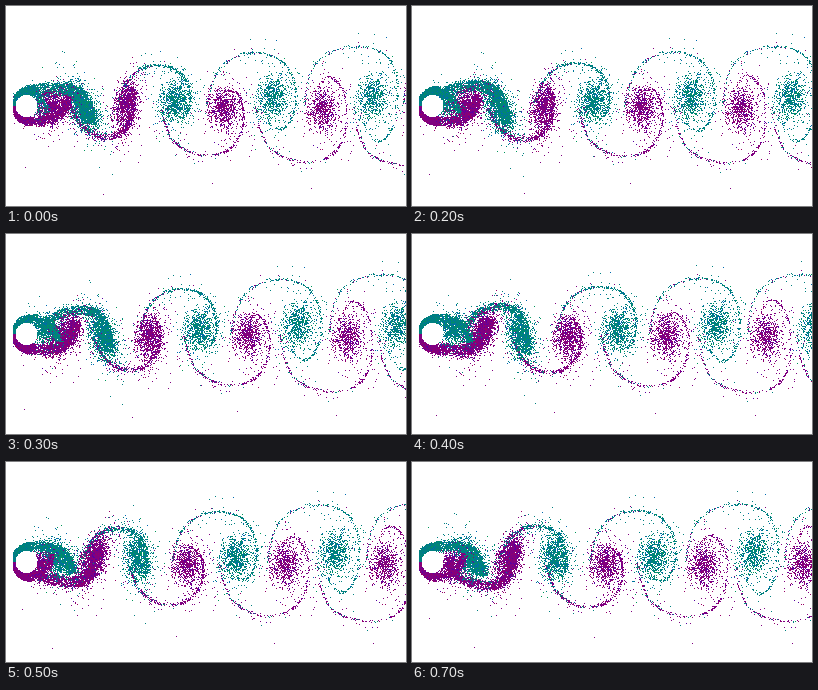
A matplotlib script that plays this animation: 400 by 200 pixels, repeating every 0.8 s.

```python
import numpy as np
import matplotlib.pyplot as plt
from matplotlib.animation import FuncAnimation

W, H = 400, 200
AXIS_Y = 100
PHASES = [0, 0, 1, 2, 3, 5, 5, 6]      # eighths of a shedding period

TEALS = np.array([(0, 128, 128), (0, 150, 90), (0, 106, 176)], np.uint8)
PURPLES = np.array([(128, 0, 128), (152, 0, 100), (88, 0, 164)], np.uint8)

# Braid paths around a vortex centre (y up), keyed by age in half periods.
PATHS = {
    0: [(-36, 6), (-31, 13), (-23, 18), (-13, 19), (-2, 18),
        (7, 14), (13, 9), (18, 3), (20, -3), (21, -9)],
    1: [(-68, 10), (-58, 19), (-45, 22), (-31, 23), (-18, 23),
        (-8, 20), (1, 13), (7, 3), (11, -8), (11, -18)],
    2: [(-56, 2), (-50, 14), (-43, 25), (-31, 32), (-17, 34),
        (-4, 30), (5, 19), (9, 6), (10, -8), (8, -20)],
    3: [(-57, 4), (-54, 14), (-47, 27), (-36, 37), (-21, 42),
        (-4, 39), (9, 29), (15, 14), (14, -4), (5, -16)],
    4: [(-62, 2), (-59, 20), (-50, 36), (-34, 47), (-14, 50),
        (5, 44), (17, 28), (20, 8), (14, -13), (-2, -16)],
    5: [(-66, 0), (-62, 20), (-51, 40), (-31, 52), (-8, 53),
        (11, 43), (22, 22), (22, -5), (9, -24), (-9, -14)],
    7: [(-68, 0), (-64, 30), (-50, 50), (-26, 59), (0, 58),
        (18, 45), (25, 18), (20, -22), (3, -36), (-13, -10)],
}
AGES = [-1] + list(PATHS)
KEYS = np.array([np.array(PATHS[0]) * (.6, .8)] + list(PATHS.values()), float)


def curve(*points):
    """Piecewise linear function of age."""
    xs, ys = zip(*points)
    return lambda s: np.interp(s, xs, ys)


core_x = curve((-1, 30), (-.5, 38), (0, 45), (.5, 58), (1, 78), (1.5, 97),
               (2, 120), (2.5, 143), (3, 169.5), (4, 218), (5, 267),
               (6, 317), (7, 367), (10, 515))
core_y = curve((-1, 2), (-.5, 5), (0, 3), (.5, 2), (1, -1), (1.4, -3),
               (2, 0), (2.3, 4), (3, 4), (4.5, 3.5), (5, 6), (6, 7), (7, 6))
core_w = curve((-1, 4), (-.5, 7), (0, 9), (1, 7), (2, 6), (3, 7.5), (5, 7.5))
core_h = curve((-1, 5), (-.5, 7), (0, 8), (1, 12), (2, 12), (3, 9.5), (5, 10.5))
core_lean = curve((0, .2), (.3, .35), (1, .42), (1.5, .28), (2, .15), (3, 0))
core_count = curve((-1.2, 0), (-1, 250), (-.5, 800), (0, 1300), (1, 1400),
                   (2, 1100), (3, 900), (5, 800), (7, 750))
band = curve((-1, 4), (0, 7), (1, 13), (1.5, 9), (2, 5), (3, 2), (4, 1))
haze = curve((-1, 1), (0, 1), (1, 2), (2, 5), (4, 7))
braid_count = curve((-1.2, 0), (-1, 250), (0, 1200), (1, 2500), (1.5, 1700),
                    (2, 900), (3, 480), (5, 350), (7, 300))


class Cloud:
    """Fixed random traits of the particles in one row of vortices."""

    def __init__(self, seed):
        rng = np.random.RandomState(seed)
        n = 1400
        self.core_rank = rng.permutation(n)
        spread = np.where(rng.rand(n) < .14, 1.8, 1.0)
        self.gx = rng.randn(n) * spread
        self.gy = rng.randn(n) * spread
        self.core_tint = rng.choice(3, n, p=[.68, .15, .17])
        n = 2500
        self.braid_rank = rng.permutation(n)
        self.u = rng.rand(n) * 8.999
        self.depth = rng.rand(n)
        self.fuzz = rng.randn(n) * .6
        self.stray = np.where(rng.rand(n) < .22, rng.randn(n), 0)
        self.mix = rng.rand(n)
        self.braid_tint = rng.choice(3, n, p=[.84, .08, .08])
        n = 750
        self.t = rng.rand(n)
        self.ring_depth = rng.rand(n)
        self.ring_tint = rng.choice(3, n, p=[.86, .07, .07])


CLOUDS = [Cloud(3), Cloud(8)]          # lower purple row, upper teal row


def path_at(s):
    s = np.clip(s, -1, 7)
    i = min(np.searchsorted(AGES, s, side="right") - 1, len(AGES) - 2)
    f = (s - AGES[i]) / (AGES[i + 1] - AGES[i])
    return KEYS[i] * (1 - f) + KEYS[i + 1] * f


def spline(pts, u):
    """Catmull-Rom points and tangents."""
    p = np.vstack([2 * pts[0] - pts[1], pts, 2 * pts[-1] - pts[-2]])
    i = u.astype(int)
    t = (u - i)[:, None]
    a, b, c, d = p[i], p[i + 1], p[i + 2], p[i + 3]
    k1, k2, k3 = c - a, 2 * a - 5 * b + 4 * c - d, 3 * b - a - 3 * c + d
    pos = b + .5 * t * (k1 + t * (k2 + t * k3))
    return pos, .5 * (k1 + t * (2 * k2 + 3 * t * k3))


def paint(img, x, y, color):
    xi, yi = np.floor(x).astype(int), np.floor(y).astype(int)
    ok = (xi >= 7) & (xi < W) & (yi >= 0) & (yi < H)
    img[yi[ok], xi[ok]] = color[ok]


def draw_vortex(img, j, s):
    top = j % 2
    sign = 1 if top else -1
    own, other = (TEALS, PURPLES) if top else (PURPLES, TEALS)
    c = CLOUDS[top]
    cx = core_x(s)

    on = c.braid_rank < braid_count(s)
    u = c.u[on]
    pos, tan = spline(path_at(s), u)
    tan /= np.hypot(tan[:, 0], tan[:, 1])[:, None] + 1e-9
    off = (c.fuzz[on] + c.stray[on] * haze(s)
           - c.depth[on] * band(s) * np.minimum(1, .3 + u / 3))
    x = cx + pos[:, 0] - tan[:, 1] * off
    y = AXIS_Y - sign * (pos[:, 1] + tan[:, 0] * off)
    foreign = c.mix[on] < .45 * np.clip(1 - u / 5, 0, 1) * np.clip(s - 1.5, 0, 1)
    tint = c.braid_tint[on]
    paint(img, x, y, np.where(foreign[:, None], other[tint], own[tint]))

    on = c.core_rank < core_count(s)
    dy = c.gy[on] * core_h(s)
    x = cx + c.gx[on] * core_w(s) - core_lean(s) * dy
    y = AXIS_Y - sign * (core_y(s) + dy) - 2 * np.clip(s - 4, 0, 1)
    paint(img, x, y, own[c.core_tint[on]])


def draw_sheath(img, top, phase):
    """Fresh particles sliding round the cylinder."""
    c = CLOUDS[top]
    t = (c.t + phase / 4) % 1
    angle = np.pi * (1 - .64 * t)
    r = 11 + c.ring_depth * (2 + 8 * t)
    y = AXIS_Y - (1 if top else -1) * r * np.sin(angle)
    colors = TEALS if top else PURPLES
    paint(img, 20.5 + r * np.cos(angle), y, colors[c.ring_tint])


yy, xx = np.mgrid[:H, :W] + .5
CYLINDER = np.hypot(xx - 20.5, yy - AXIS_Y) < 11


def render(phase):
    img = np.full((H, W, 3), 255, np.uint8)
    for j in range(9, -4, -1):
        s = j + phase / 4
        if s > -1.2:
            draw_vortex(img, j, s)
    for top in (0, 1):
        draw_sheath(img, top, phase)
    img[CYLINDER] = 255
    return img


fig = plt.figure(figsize=(4, 2), dpi=100, facecolor="white")
ax = fig.add_axes([0, 0, 1, 1])
ax.axis("off")
view = ax.imshow(render(0), aspect="auto", interpolation="nearest")


def update(i):
    view.set_data(render(PHASES[i % len(PHASES)]))
    return [view]


anim = FuncAnimation(fig, update, frames=len(PHASES), interval=100,
                     repeat=True, repeat_delay=0, blit=False)
plt.show()
```
